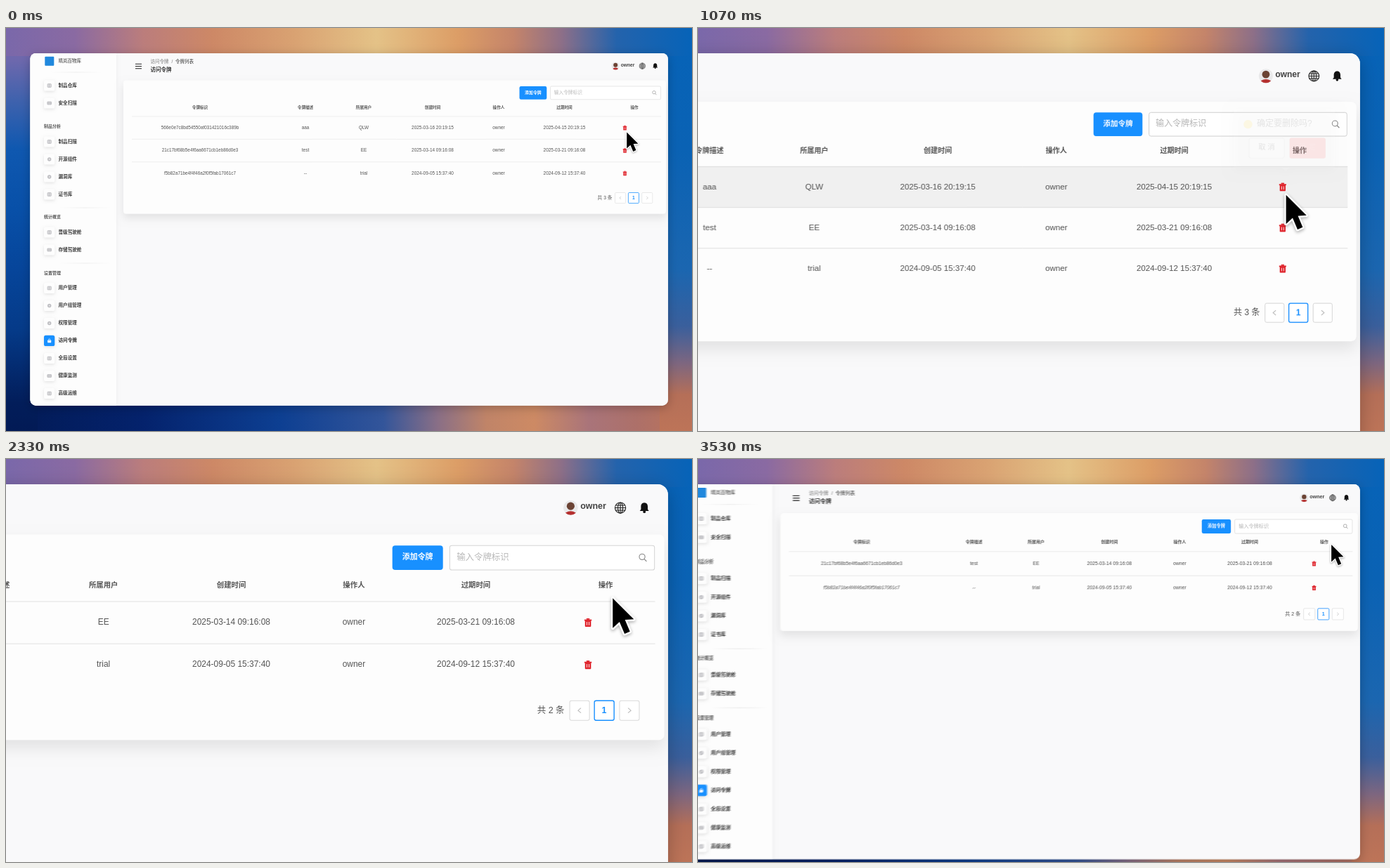
Animation, 976 px wide and 574 px high, one loop 3590 ms. Source, as an HTML page with a canvas:

```html
<!DOCTYPE html>
<html lang="zh-CN">
<head>
<meta charset="utf-8">
<title>访问令牌</title>
<style>
html, body { margin: 0; width: 976px; height: 574px; overflow: hidden; background: #0a62b8; }
canvas { display: block; }
</style>
</head>
<body>
<canvas id="stage" width="976" height="574"></canvas>
<script>
const W = 976, H = 574, LOOP = 3590, TICK = 200 / 3;
const WIN = { x: 34.5, y: 36, r: 941.8, b: 537.7 };
const ZOOM = 1.856, ZOOM_IN = 413, ZOOM_OUT = 2890;
const ROW_H = 32.4;
const BLUE = '#1890ff', RED = '#ff4d4f', INK = '#333', GREY = '#555';

const view = document.getElementById('stage').getContext('2d');
const layer = document.createElement('canvas');
layer.width = W;
layer.height = H;
const c = layer.getContext('2d');

// ---- timing ----
const clamp = v => Math.max(0, Math.min(1, v));
const ramp = (t, a, b) => clamp((t - a) / (b - a));
const smooth = v => v * v * (3 - 2 * v);
const mix = (a, b, p) => a + (b - a) * p;

// Overdamped spring from 0 to 1
function spring(ms) {
  if (ms <= 0) return 0;
  const a = 4.25, b = 30, t = ms / 1000;
  return 1 - (b * Math.exp(-a * t) - a * Math.exp(-b * t)) / (b - a);
}
const zoomAt = t => 1 + (ZOOM - 1) * (t < ZOOM_OUT ? spring(t - ZOOM_IN) : 1 - spring(t - ZOOM_OUT));

function stateAt(t) {
  const go = smooth(ramp(t, 1400, 1720)), leave = smooth(ramp(t, 2270, 2600));
  return {
    x: mix(mix(882.2, 898, go), 902.6, leave),
    y: mix(mix(146.7, 122.3, go), 115, leave),
    hand: t > 1590 && t < 2190,
    hover: ramp(t, 560, 900) * (1 - ramp(t, 1470, 1600)),
    popup: ramp(t, 1050, 1190) * (1 - ramp(t, 2100, 2220)),
    removed: t > 2255
  };
}

// ---- drawing helpers ----
function text(s, x, y, size, color = GREY, weight = 400, align = 'center') {
  c.font = `${weight} ${size}px "Liberation Sans","Noto Sans CJK SC","Noto Sans CJK",sans-serif`;
  c.textAlign = align;
  c.textBaseline = 'middle';
  c.fillStyle = color;
  c.fillText(s, x, y);
}
function box(x, y, w, h, r, fill, stroke, lw = 0.55) {
  c.beginPath();
  c.roundRect(x, y, w, h, r);
  if (fill) { c.fillStyle = fill; c.fill(); }
  if (stroke) { c.strokeStyle = stroke; c.lineWidth = lw; c.stroke(); }
}
function disc(x, y, r, fill) {
  c.beginPath();
  c.arc(x, y, r, 0, 7);
  c.fillStyle = fill;
  c.fill();
}
function line(color, lw, ...p) {
  c.beginPath();
  for (let i = 0; i < p.length; i += 2) c.lineTo(p[i], p[i + 1]);
  c.strokeStyle = color;
  c.lineWidth = lw;
  c.stroke();
}
function shadow(color, blur, dy, scale, draw) {
  c.save();
  c.shadowColor = color;
  c.shadowBlur = blur * scale;
  c.shadowOffsetY = dy * scale;
  draw();
  c.restore();
}
function strip(x, y, w, h, vertical, stops) {
  const g = vertical ? c.createLinearGradient(0, 0, 0, H) : c.createLinearGradient(0, 0, W, 0);
  for (const [at, color] of stops) g.addColorStop(at, color);
  c.fillStyle = g;
  c.fillRect(x, y, w, h);
}

// ---- wallpaper ----
function wallpaper() {
  strip(0, 500, W, 74, false, [[0, '#021a55'], [.2, '#04226c'], [.4, '#0d3f92'], [.55, '#33559a'], [.63, '#8a6f86'],
    [.7, '#c08468'], [.77, '#cd8a64'], [.85, '#a9747a'], [.92, '#ad7069'], [1, '#bd7458']]);
  strip(0, 0, 45, H, true, [[0, '#7a68aa'], [.08, '#6d68ad'], [.18, '#3f62ad'], [.3, '#0f58b0'],
    [.45, '#0850a8'], [.6, '#06459a'], [.75, '#053a88'], [.93, '#021d5a'], [1, '#021a55']]);
  strip(930, 0, 46, H, true, [[0, '#0663b8'], [.3, '#0a62b4'], [.6, '#1b66b0'], [.74, '#3a5f9c'],
    [.83, '#7c6680'], [.91, '#b56f58'], [1, '#bd7458']]);
  strip(0, 0, W, 40, false, [[0, '#7a68aa'], [.1, '#8a6aa2'], [.2, '#bb7d7c'], [.3, '#cd8866'], [.42, '#d9a272'],
    [.54, '#e4c287'], [.66, '#dc9d66'], [.74, '#c4846a'], [.81, '#8d6f88'], [.89, '#2463ac'], [1, '#0663b8']]);
}

// ---- sidebar ----
const MENU = [
  [82, '制品仓库'], [107, '安全扫描'],
  [162, '制品扫描'], [187, '开源组件'], [212, '漏洞库'], [237, '证书库'],
  [291, '晋级驾驶舱'], [316, '存储驾驶舱'],
  [370.5, '用户管理'], [395.5, '用户组管理'], [420.5, '权限管理'], [445.5, '访问令牌'],
  [470.5, '全局设置'], [495.5, '健康监测'], [520.5, '高级运维']
];
const GROUPS = [[140, '制品分析'], [269, '统计概览'], [349, '设置管理']];

function glyph(kind, x, y) {
  const g = '#b4b4b8';
  if (kind === 0) {
    box(x - 2.6, y - 2.4, 5.2, 4.8, .6, '#dcdcde', g, .7);
    line(g, .6, x, y - 2.4, x, y + 2.4);
  } else if (kind === 1) {
    box(x - 2.8, y - 2, 5.6, 4, .5, '#d4d4d7', g, .7);
    line(g, .6, x - 2.8, y, x + 2.8, y);
  } else {
    disc(x, y, 2.7, '#bfbfc3');
    disc(x, y, 1, '#e6e6e8');
  }
}
function sidebar(s) {
  shadow('rgba(0,0,0,.05)', 5, 0, s, () => { c.fillStyle = '#fdfdfd'; c.fillRect(34, 36, 123, 502); });
  box(55.3, 40.8, 13, 13, 1, '#2088dd');
  text('晴岚百物库', 74.5, 47, 6.5, INK, 500, 'left');
  for (const [x, y] of [[62, 63], [75, 256], [75, 335]]) {
    const g = c.createLinearGradient(x, 0, x + 75, 0);
    g.addColorStop(0, 'rgba(0,0,0,0)');
    g.addColorStop(.5, 'rgba(0,0,0,.13)');
    g.addColorStop(1, 'rgba(0,0,0,0)');
    line(g, .5, x, y, x + 75, y);
  }
  for (const [y, name] of GROUPS) text(name, 54, y, 6, GREY, 700, 'left');
  MENU.forEach(([y, name], i) => {
    const on = name === '访问令牌';
    shadow('rgba(0,0,0,.1)', 4, 1.5, s, () => box(54, y - 7.7, 15.3, 15.3, 2.6, on ? BLUE : '#fdfdfd'));
    if (on) {
      box(59.2, y - .8, 5, 3.6, .5, '#fff');
      c.beginPath();
      c.arc(61.7, y - 1, 1.5, Math.PI, 0);
      c.strokeStyle = '#fff';
      c.lineWidth = .8;
      c.stroke();
    } else glyph([0, 1, 0, 2, 2, 0][i % 6], 61.7, y);
    text(name, 74.5, y, 6.6, on ? '#222' : '#3c3c3c', 700, 'left');
  });
}

// ---- top bar ----
function topBar() {
  for (const y of [51.3, 54.5, 57.7]) line('#222', 1.1, 184, y, 193, y);
  text('访问令牌', 205.5, 48, 6.5, '#777', 400, 'left');
  text('/', 236.5, 48, 6.5, '#777');
  text('令牌列表', 241, 48, 6.5, INK, 500, 'left');
  text('访问令牌', 205.5, 59.7, 7.5, INK, 700, 'left');

  c.save();
  c.beginPath();
  c.arc(867.2, 54, 5.6, 0, 7);
  c.clip();
  c.fillStyle = '#e9e9ea';
  c.fillRect(860, 47, 14, 14);
  c.fillStyle = '#b5302f';
  c.beginPath();
  c.ellipse(867.2, 60.2, 5, 3.6, 0, 0, 7);
  c.fill();
  disc(867.2, 52.8, 3, '#6b4334');
  c.restore();
  text('owner', 884.5, 53, 6.7, '#444', 700);

  c.strokeStyle = '#222';
  c.lineWidth = .6;
  for (const rx of [4.1, 1.9]) {
    c.beginPath();
    c.ellipse(905.3, 54.1, rx, 4.1, 0, 0, 7);
    c.stroke();
  }
  line('#222', .6, 905.3, 50, 905.3, 58.2);
  for (const [dy, w] of [[-1.9, 3.6], [0, 4.1], [1.9, 3.6]]) line('#222', .55, 905.3 - w, 54.1 + dy, 905.3 + w, 54.1 + dy);

  c.fillStyle = '#111';
  c.fill(new Path2D('M923.7 50.2c1.9 0 2.6 1.5 2.6 3v2l.9 1.3h-7l.9-1.3v-2c0-1.5.7-3 2.6-3z'));
  disc(923.7, 57.1, 1, '#111');
}

// ---- token table ----
const COLS = [276, 426, 509, 607, 701, 794.5];
const HEADS = ['令牌标识', '令牌描述', '所属用户', '创建时间', '操作人', '过期时间'];
const ROWS = [
  ['566e0e7c8bd54550af031421016c389b', 'aaa', 'QLW', '2025-03-16 20:19:15', 'owner', '2025-04-15 20:19:15'],
  ['21c17bf68b5e4f6aa6671cb1eb86d0e3', 'test', 'EE', '2025-03-14 09:16:08', 'owner', '2025-03-21 09:16:08'],
  ['f5b82a71be4f4f46a2f0f5fab17061c7', '--', 'trial', '2024-09-05 15:37:40', 'owner', '2024-09-12 15:37:40']
];

function trash(x, y) {
  const red = '#e0252d';
  c.fillStyle = red;
  c.fillRect(x - 2.8, y - 2.4, 5.6, 1);
  c.fillRect(x - 1.2, y - 3.3, 2.4, 1);
  box(x - 2.3, y - 1.8, 4.6, 5, .5, red);
  for (const dx of [-.8, .8]) line('#fff', .5, x + dx, y - .6, x + dx, y + 2);
}
function table(st, s) {
  const rows = st.removed ? ROWS.slice(1) : ROWS;
  const bottom = 167.5 + ROW_H * rows.length;
  shadow('rgba(0,0,0,.09)', 12, 6, s, () => box(167, 74.5, 772, bottom - 74.5, 4, '#fdfdfd'));

  box(730.5, 83, 38.8, 18.8, 2.2, BLUE);
  text('添加令牌', 749.9, 92.1, 5.9, '#fff', 700);
  box(774.5, 83, 157, 18.8, 1.6, '#fff', '#d4d4d4');
  text('输入令牌标识', 779.8, 92.1, 6.7, '#b8b8b8', 400, 'left');
  c.beginPath();
  c.arc(922, 91.7, 2.2, 0, 7);
  c.strokeStyle = '#888';
  c.lineWidth = .6;
  c.stroke();
  line('#888', .7, 923.6, 93.3, 925.4, 95.2);

  HEADS.forEach((h, i) => text(h, COLS[i], 113.4, 5.6, GREY, 700));
  text('操作', 894, 113.4, 5.6, GREY, 700);
  if (st.hover) {
    c.fillStyle = `rgba(240,240,240,${st.hover})`;
    c.fillRect(179, 126, 753, ROW_H);
  }
  rows.forEach((row, n) => {
    const y = 142.2 + n * ROW_H;
    line('#dfdfdf', .5, 179, y - 16.2, 932, y - 16.2);
    row.forEach((v, i) => text(v, COLS[i], y, i ? 6.45 : 6.35));
    trash(880.5, y);
  });

  const py = bottom - 22.7;
  text(`共 ${rows.length} 条`, 852, py, 6.7);
  [866.5, 885.4, 904.7].forEach((x, i) =>
    box(x, py - 7.5, 15.1, 15.1, 1.3, '#fff', i === 1 ? BLUE : '#d9d9d9', i === 1 ? .75 : .55));
  text('1', 892.9, py + .3, 6.7, BLUE, 700);
  line('#bbb', .6, 875.1, py - 1.9, 872.9, py, 875.1, py + 1.9);
  line('#bbb', .6, 911.2, py - 1.9, 913.4, py, 911.2, py + 1.9);
}

function popup(st, s) {
  if (!st.popup) return;
  c.save();
  c.globalAlpha = st.popup;
  shadow('rgba(0,0,0,.16)', 8, 2, s, () => {
    c.beginPath();
    c.roundRect(841.8, 79.8, 80.2, 47.2, 1.6);
    c.moveTo(879.8, 127);
    c.lineTo(883, 129.6);
    c.lineTo(886.2, 127);
    c.fillStyle = '#fff';
    c.fill();
  });
  disc(853, 92.4, 3.4, '#f8d32f');
  text('确定要删除吗?', 860, 92, 6.7, '#444', 400, 'left');
  box(853.8, 103.4, 28, 15.8, 1.5, '#fff', '#d0d0d0');
  text('取 消', 867.8, 110.8, 5.7, '#444', 500);
  box(886, 103.2, 28.5, 16.2, 1.5, st.hand ? '#ff6164' : RED);
  text('确 定', 900.2, 110.8, 5.7, '#fff', 700);
  c.restore();
}

// ---- mouse ----
const ARROW = new Path2D('M1 1.8V24.8L6.2 20L10.1 29.2L14.2 27.4L10.4 18.4L17.2 18Z');
const HAND = new Path2D('M-2 2.2A2.1 2.1 0 0 1 2.2 2.2V9.5A2 2 0 0 1 6.2 10V10.8A2 2 0 0 1 10 11.3V12.2A1.9 1.9 0 0 1 13.6 13V18.5Q13.6 21 12.2 22.6V25.2H-.6V23Q-4 19.5-7.3 15.2A2 2 0 0 1-4.2 12.8L-2 15.3Z');

function mouse(st, s) {
  c.save();
  c.translate(st.x, st.y);
  c.lineJoin = 'round';
  const shape = st.hand ? HAND : ARROW;
  if (st.hand) c.rotate(-.2);
  shadow('rgba(0,0,0,.3)', 2.5, 1, s, () => {
    c.strokeStyle = '#fff';
    c.lineWidth = st.hand ? 3.4 : 2.6;
    c.stroke(shape);
  });
  c.fillStyle = st.hand ? '#fff' : '#000';
  c.fill(shape);
  if (st.hand) {
    c.strokeStyle = '#000';
    c.lineWidth = 1.6;
    c.stroke(shape);
    for (const x of [2.2, 5.8, 9.4]) line('#000', 1.4, x, 14.5, x, 21);
  }
  c.restore();
}

// ---- whole picture at one zoom ----
function scene(st, s) {
  wallpaper();
  c.save();
  c.translate(WIN.r, WIN.y);
  c.scale(s, s);
  c.translate(-WIN.r, -WIN.y);
  const frame = () => box(WIN.x, WIN.y, WIN.r - WIN.x, WIN.b - WIN.y, 8, '#f9f9fa');
  shadow('rgba(0,0,0,.24)', 14, 3, s, frame);
  c.save();
  frame();
  c.clip();
  sidebar(s);
  topBar();
  table(st, s);
  popup(st, s);
  c.restore();
  mouse(st, s);
  c.restore();
}

function render(t) {
  const st = stateAt(t), s = zoomAt(t);
  // Motion blur: average a few zoom levels
  const speed = (zoomAt(t + 5) - zoomAt(t - 5)) / 10;
  const spread = Math.min(.012, Math.abs(speed) * 12);
  const passes = spread < .0008 ? 1 : 8;
  for (let i = 0; i < passes; i++) {
    scene(st, passes > 1 ? s + spread * (i / (passes - 1) - .5) : s);
    view.globalAlpha = 1 / (i + 1);
    view.drawImage(layer, 0, 0);
  }
}

const start = performance.now();
let last = -1;
function loop() {
  const t = (performance.now() - start) % LOOP;
  const tick = Math.min(53, Math.floor((t + 4) / TICK));
  if (tick !== last) render((last = tick) * TICK);
  requestAnimationFrame(loop);
}
loop();
</script>
</body>
</html>
```
